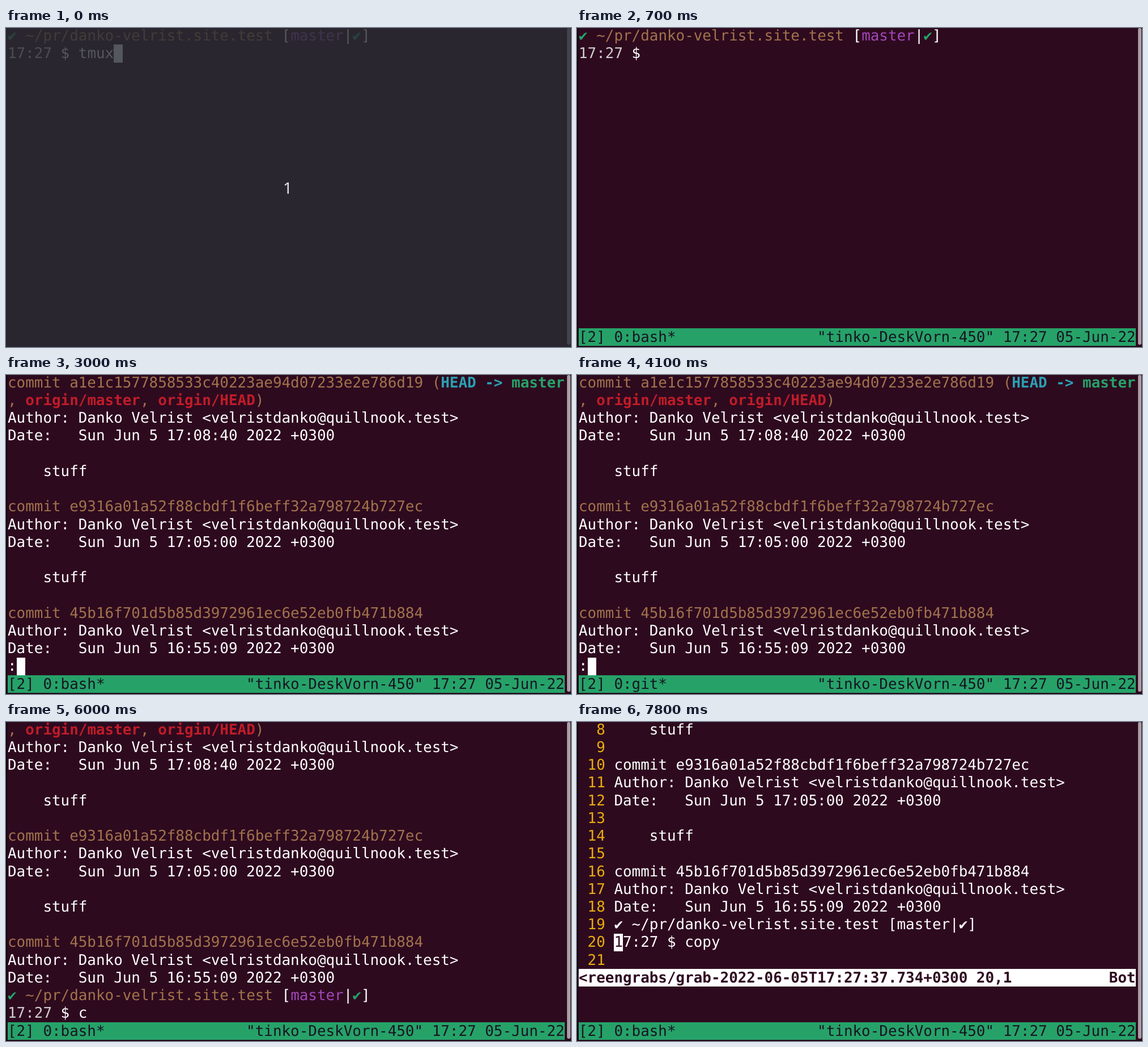
These frames come from a looping animation (997x562 px, 8 s). An HTML page:

```html
<!DOCTYPE html>
<html lang="en">
<head>
<meta charset="utf-8">
<title>Terminal session</title>
<style>
  html, body { margin: 0; width: 100%; height: 100%; overflow: hidden; background: #2e0a1f; }
  #stage {
    position: absolute; left: 0; top: 0; width: 997px; height: 562px; overflow: hidden;
    background: #2e0a1f; color: #fff;
    font: 25.91px/31.22px "DejaVu Sans Mono", monospace;
    text-rendering: geometricPrecision; font-kerning: none; font-variant-ligatures: none;
  }
  #edge { position: absolute; inset: 0; border-left: 2px solid #10030b; border-bottom: 1px solid #10030b; }
  #bar { position: absolute; left: 990px; top: 0; width: 6px; height: 558px; border-radius: 3px; background: #a99fa4; }
  #cursor { position: absolute; width: 15.6px; height: 31.22px; background: #fff; }
  .row { position: absolute; left: 3px; width: 982.8px; height: 31.22px; white-space: pre; }
  .row span { position: relative; top: .65px; }
  .tmux { background: #26a269; color: #171421; }
  .vim { background: #fff; color: #2e0a1f; font-weight: bold; }
  .time { color: #d0cfcc; }
  .path { color: #a2734c; }
  .branch { color: #a347ba; }
  .ok { color: #26a269; }
  .head { color: #2aa1b3; font-weight: bold; }
  .local { color: #26a269; font-weight: bold; }
  .remote { color: #c01c28; font-weight: bold; }
  .num { color: #e9ad0c; }
  .inv { color: #2e0a1f; }
  #shade { position: absolute; inset: 0; background: rgba(42, 45, 52, .8); }
  #count {
    position: absolute; left: 0; width: 994px; top: 262px; text-align: center; color: #e4e3e5;
    font: 28px/40px "Noto Sans", "Open Sans", sans-serif;
  }
</style>
</head>
<body>
<div id="stage">
  <div id="edge"></div>
  <div id="bar"></div>
  <div id="cursor"></div>
  <div id="screen"></div>
  <div id="shade"><div id="count">1</div></div>
</div>
<script>
const LOOP = 8000, COL = 15.6, ROW = 31.22, LEFT = 3, TOP = -1.85;
const $ = id => document.getElementById(id);

// A line is a list of [class, text] pieces.
const plain = text => [['', text]];
const textOf = line => line.map(piece => piece[1]).join('');

const repo = [
  ['ok', '✔'], ['path', ' ~/pr/danko-velrist.site.test'], ['', ' ['],
  ['branch', 'master'], ['', '|'], ['ok', '✔'], ['', ']']
];
const shell = typed => [repo, [['time', '17:27'], ['', ' $ ' + typed]]];

const entry = (hash, time) => [
  [['path', 'commit ' + hash]],
  plain('Author: Danko Velrist <velristdanko@quillnook.test>'),
  plain(`Date:   Sun Jun 5 ${time} 2022 +0300`),
  [], plain('    stuff'), []
];

const log = [
  ...entry('a1e1c1577858533c40223ae94d07233e2e786d19', '17:08:40'),
  ...entry('e9316a01a52f88cbdf1f6beff32a798724b727ec', '17:05:00'),
  ...entry('45b16f701d5b85d3972961ec6e52eb0fb471b884', '16:55:09').slice(0, 3)
];
log[0].push(['path', ' ('], ['head', 'HEAD -> '], ['local', 'master']);
log.splice(1, 0, [
  ['path', ', '], ['remote', 'origin/master'], ['path', ', '],
  ['remote', 'origin/HEAD'], ['path', ')']
]);

const pager = [...log, plain(':')];
const after = typed => [...log.slice(1), ...shell(typed)];

function editor(line, place) {
  const body = [...log.slice(5), ...shell('copy'), []].map((l, i) => {
    const n = i + 8, text = textOf(l), num = ['num', String(n).padStart(3) + ' '];
    return n === line ? [num, ['inv', text.slice(0, 1)], ['', text.slice(1)]] : [num, ['', text]];
  });
  const name = '<reengrabs/grab-2022-06-05T17:27:37.734+0300 ';
  const bar = plain((name + place).padEnd(60) + 'Bot');
  bar.style = 'vim';
  return [...body, bar];
}

function status(task) {
  const line = plain(`[2] 0:${task}*`.padEnd(27) + '"tinko-DeskVorn-450" 17:27 05-Jun-22');
  line.style = 'tmux';
  return line;
}

// [start ms, lines, cursor [row, col] or null, running task]
const cues = [
  [0, shell('tmux'), [1, 12], ''],
  [200, [], [0, 0], 'bash'],
  [500, shell(''), [1, 8], 'bash'],
  [700, shell(''), null, 'bash'],
  [1300, shell(''), [1, 8], 'bash'],
  [1900, shell('g'), [1, 9], 'bash'],
  [2000, shell('gi'), [1, 10], 'bash'],
  [2100, shell('git'), [1, 11], 'bash'],
  [2200, shell('git '), [1, 12], 'bash'],
  [2500, shell('git l'), [1, 13], 'bash'],
  [2700, shell('git lo'), [1, 14], 'bash'],
  [2800, shell('git log'), [1, 15], 'bash'],
  [3000, pager, [16, 1], 'bash'],
  [3600, pager, null, 'bash'],
  [4100, pager, [16, 1], 'git'],
  [4700, pager, null, 'git'],
  [4800, log, [16, 0], 'git'],
  [4900, after(''), [16, 8], 'git'],
  [5300, after(''), [16, 8], 'bash'],
  [5400, after('c'), [16, 9], 'bash'],
  [6000, after('c'), null, 'bash'],
  [6200, after('c'), [16, 9], 'bash'],
  [6300, after('co'), [16, 10], 'bash'],
  [6500, after('cop'), [16, 11], 'bash'],
  [6900, after('copy'), [16, 12], 'bash'],
  [7100, [], [0, 0], 'bash'],
  [7200, editor(21, '21,0-1'), [13, 4], 'bash'],
  [7800, editor(20, '20,1'), [12, 4], 'bash']
];

function rowNode(line, row) {
  const node = document.createElement('div');
  node.className = 'row ' + (line.style || '');
  node.style.top = TOP + row * ROW + 'px';
  for (const [cls, text] of line) {
    const span = document.createElement('span');
    span.className = cls;
    span.textContent = text;
    node.append(span);
  }
  return node;
}

function show([, lines, cursor, task]) {
  const rows = lines.map(rowNode);
  if (task) rows.push(rowNode(status(task), 17));
  $('screen').replaceChildren(...rows);
  $('cursor').hidden = !cursor;
  if (cursor) {
    $('cursor').style.top = TOP + cursor[0] * ROW + 'px';
    $('cursor').style.left = LEFT + cursor[1] * COL + 'px';
  }
}

let shown = null;
const start = performance.now();

function draw() {
  const t = (performance.now() - start) % LOOP;
  const cue = cues.findLast(c => c[0] <= t);
  if (cue !== shown) show(shown = cue);
  $('shade').hidden = t >= 100;
  requestAnimationFrame(draw);
}
draw();
</script>
</body>
</html>
```
